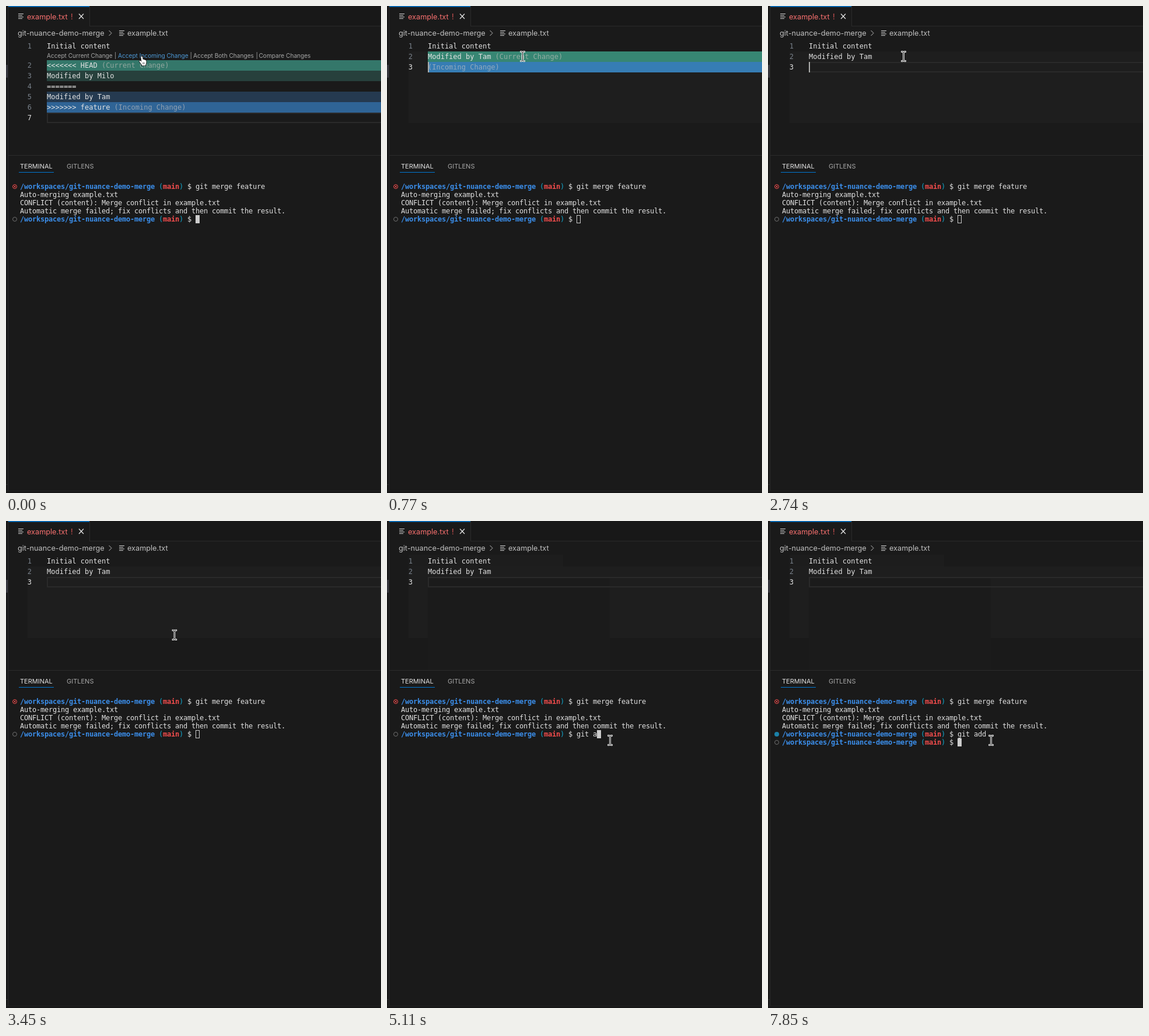
Animation of 643x836 px, one loop 8000 ms. Source, as an HTML page with a canvas:

```html
<!DOCTYPE html>
<html lang="en">
<head>
<meta charset="utf-8">
<title>Resolving a merge conflict</title>
<style>
html, body { margin: 0; width: 100%; height: 100%; overflow: hidden; background: #1a1a1a; }
canvas { display: block; }
</style>
</head>
<body>
<canvas id="stage" width="643" height="836"></canvas>
<script>
const ctx = document.getElementById('stage').getContext('2d');
const LOOP = 8000, CELL = 7, ROW = 14, LINE = 18;
const UI = 'Inter, sans-serif', MONO = '"DejaVu Sans Mono", monospace';
const CODE = `12px ${MONO}`, LABEL = `12.7px ${UI}`;
const FG = '#e2e2e2', CRUMB = '#c0c0c0', EDGE = '#2b2b2b', ACCENT = '#0078d4';
const NOTE = 'rgba(210,200,195,.6)';

// Times of the main events, in ms
const ACCEPT = 650, SETTLE = 880, MOVE = 3210, FOCUS = 3930, ENTER = 7380, PROMPT = 7790;
const caretOn = [[ACCEPT, 1240], [1720, 2200], [2740, 3240], [3740, FOCUS]];
const typing = [[4710, 'g'], [4795, 'git'], [4880, 'git '], [5110, 'git a'], [5290, 'git ad'],
  [5470, 'git add'], [5650, 'git add '], [6180, 'git add .']];

const hand = new Path2D('M3 1.8C3 .2 5.4 .2 5.6 1.8L6.1 6C6.8 5.2 8 5.5 8.2 6.5C9 5.8 10 6.2 10.2 7.1' +
  'C11.2 6.6 12 7.3 12 8.4V11C12 13 10.8 13.6 10.8 16.3H4.8C4.6 14.2 2.7 13 1.6 11.2' +
  'L.4 9.5C-.4 8 1.2 7 2.2 8.1L3.8 9.9Z');
const beam = new Path2D('M-2.8 -8C-1 -8 0 -7.5 0 -6C0 -7.5 1 -8 2.8 -8M0 -6V6M-2.8 8C-1 8 0 7.5 0 6C0 7.5 1 8 2.8 8');

function box(x, y, w, h, color) {
  ctx.fillStyle = color;
  ctx.fillRect(x, y, w, h);
}

function text(str, x, y, font, color, align = 'left') {
  ctx.font = font;
  ctx.fillStyle = color;
  ctx.textAlign = align;
  ctx.fillText(str, x, y);
}

function stroke(path, color, width = 1) {
  ctx.strokeStyle = color;
  ctx.lineWidth = width;
  ctx.stroke(path);
}

function dot(x, y, r, color, filled) {
  const path = new Path2D();
  path.arc(x, y, r, 0, 2 * Math.PI);
  ctx.fillStyle = color;
  if (filled) ctx.fill(path); else stroke(path, color);
}

function fileIcon(x, y) {
  [9, 7, 9, 7].forEach((w, i) => box(x, y + i * 2.7, w, 1, '#d0d0d0'));
}

function drawFrame() {
  box(0, 0, 643, 836, '#1a1a1a');
  box(143, 0, 500, 35, '#181818');
  box(143, 34, 500, 1, EDGE);
  box(143, 0, 1, 35, EDGE);
  box(0, 0, 4, 836, '#181818');
  box(3, 0, 1, 832, EDGE);
  box(0, 101, 3, 22, '#37373d');
  box(0, 821, 3, 1, EDGE);
  box(0, 832, 643, 4, '#181818');
  box(0, 832, 643, 1, '#222');
  box(4, 0, 139, 1.5, ACCENT);
  fileIcon(21, 13);
  text('example.txt', 36, 22.5, LABEL, '#f8706f');
  text('!', 111, 22.5, LABEL, '#d95555');
  stroke(new Path2D('M125 13.5l8 8.5m0 -8.5l-8 8.5'), '#e8e8e8', 1.2);
  text('git-nuance-demo-merge', 20, 51, LABEL, CRUMB);
  stroke(new Path2D('M176.5 42l4.5 4.5l-4.5 4.5'), CRUMB);
  fileIcon(194, 42);
  text('example.txt', 208, 51, LABEL, CRUMB);
}

function codeLine(num, y, str, { note = '', fill, active } = {}) {
  if (fill) box(70, y, 573, LINE, fill);
  if (active && !fill) stroke(new Path2D(`M643 ${y + 1}H71v16H643`), '#2a2a2a', 2);
  text(num, 44, y + 13, CODE, active ? '#e2e2e2' : '#78808a', 'right');
  text(str, 70, y + 13, CODE, FG);
  if (note) text(note, 70 + ctx.measureText(str).width, y + 13, CODE, NOTE);
}

function drawEditor(t) {
  if (t >= ACCEPT) box(37, 78, 606, 123, '#1e1e1e');
  if (t >= FOCUS) {
    box(37, 58, 265, 20, '#1d1d1d');
    box(70, 97, 312, 159, '#1b1b1b');
  }
  codeLine(1, 60, 'Initial content');
  if (t < ACCEPT) {
    [[70, 'Accept Current Change'], [192, 'Accept Incoming Change', '#4e9ad8'], [321, 'Accept Both Changes'],
      [433.5, 'Compare Changes'], [186, '|'], [315.5, '|'], [428.5, '|']]
      .forEach(([x, str, color = '#a8a8a8']) => text(str, x, 89, `10.1px ${UI}`, color));
    codeLine(2, 93, '<<<<<<< HEAD', { note: ' (Current Change)', fill: '#34776a' });
    codeLine(3, 111, 'Modified by Milo', { fill: '#27403c' });
    codeLine(4, 129, '=======');
    codeLine(5, 147, 'Modified by Tam', { fill: '#253a50' });
    codeLine(6, 165, '>>>>>>> feature', { note: ' (Incoming Change)', fill: '#2f6496' });
    codeLine(7, 183, '', { active: true });
    return;
  }
  const flash = t < SETTLE;
  codeLine(2, 78, 'Modified by Tam', flash ? { note: ' (Current Change)', fill: '#378673' } : {});
  codeLine(3, 96, '', flash ? { note: '(Incoming Change)', fill: '#367db4', active: true } : { active: true });
  if (caretOn.some(([from, to]) => t >= from && t < to)) box(70, 96, 2, LINE, '#aeafad');
}

// Every character sits in its own terminal cell
function cells(str, col, row, color = FG, bold = '') {
  [...str].forEach((ch, i) =>
    text(ch, 24 + (col + i) * CELL, 314 + row * ROW, `${bold} 12px ${MONO}`, color));
}

function prompt(row, command) {
  cells('/workspaces/git-nuance-demo-merge', 0, row, '#3b8eea', 'bold');
  cells('(', 34, row, '#11a8cd');
  cells('main', 35, row, '#f14c4c', 'bold');
  cells(')', 39, row, '#11a8cd');
  cells('$ ' + command, 41, row);
}

function drawTerminal(t) {
  box(4, 256, 639, 1, EDGE);
  text('TERMINAL', 24, 278.5, `11px ${UI}`, '#e0e0e0');
  text('GITLENS', 104, 278.5, `11px ${UI}`, '#a8a8a8');
  box(22, 285, 60, 1, ACCENT);

  dot(15, 310, 3.5, '#f14c4c');
  stroke(new Path2D('M13.4 308.4l3.2 3.2m0 -3.2l-3.2 3.2'), '#f14c4c');
  prompt(0, 'git merge feature');
  ['Auto-merging example.txt', 'CONFLICT (content): Merge conflict in example.txt',
    'Automatic merge failed; fix conflicts and then commit the result.']
    .forEach((str, i) => cells(str, 0, i + 1));

  const [, command] = typing.findLast(([at]) => t >= at) || [0, ''];
  prompt(4, command);
  const done = t >= PROMPT;
  dot(15, 366, done ? 4 : 3.5, done ? '#1b81a8' : '#707070', done);
  if (done) {
    prompt(5, '');
    dot(15, 380, 3.5, '#707070');
  }

  const row = t < ENTER ? 4 : 5;
  const col = t < ENTER ? 43 + command.length : done ? 43 : 0;
  const x = 24 + col * CELL, y = 303 + row * ROW;
  if (t < ACCEPT || t >= FOCUS) {
    box(x, y, CELL, ROW, '#cccccc');
  } else {
    ctx.strokeStyle = '#cccccc';
    ctx.lineWidth = 1;
    ctx.strokeRect(x + .5, y + .5, CELL - 1, ROW - 1);
  }
}

function drawPointer(t) {
  ctx.save();
  if (t < ACCEPT) {
    ctx.translate(228.5, 86);
    stroke(hand, '#111', 1.6);
    ctx.fillStyle = '#fff';
    ctx.fill(hand);
    stroke(new Path2D('M6.4 10.5v3.6m2 -3.6v3.6'), '#222', .7);
  } else {
    // The pointer was sampled every 60 ms
    const step = t < MOVE ? 0 : Math.floor((t - MOVE) / 60) + 1;
    const p = Math.min(step / 12, 1), ease = p * p * (3 - 2 * p);
    ctx.translate(232.5 + 150 * ease, 86.5 + 290 * ease);
    ctx.lineCap = 'square';
    stroke(beam, '#fff', 2.8);
    stroke(beam, '#111', 1);
  }
  ctx.restore();
}

function draw(now) {
  const t = now % LOOP;
  drawFrame();
  drawEditor(t);
  drawTerminal(t);
  drawPointer(t);
  requestAnimationFrame(draw);
}
requestAnimationFrame(draw);
</script>
</body>
</html>
```
